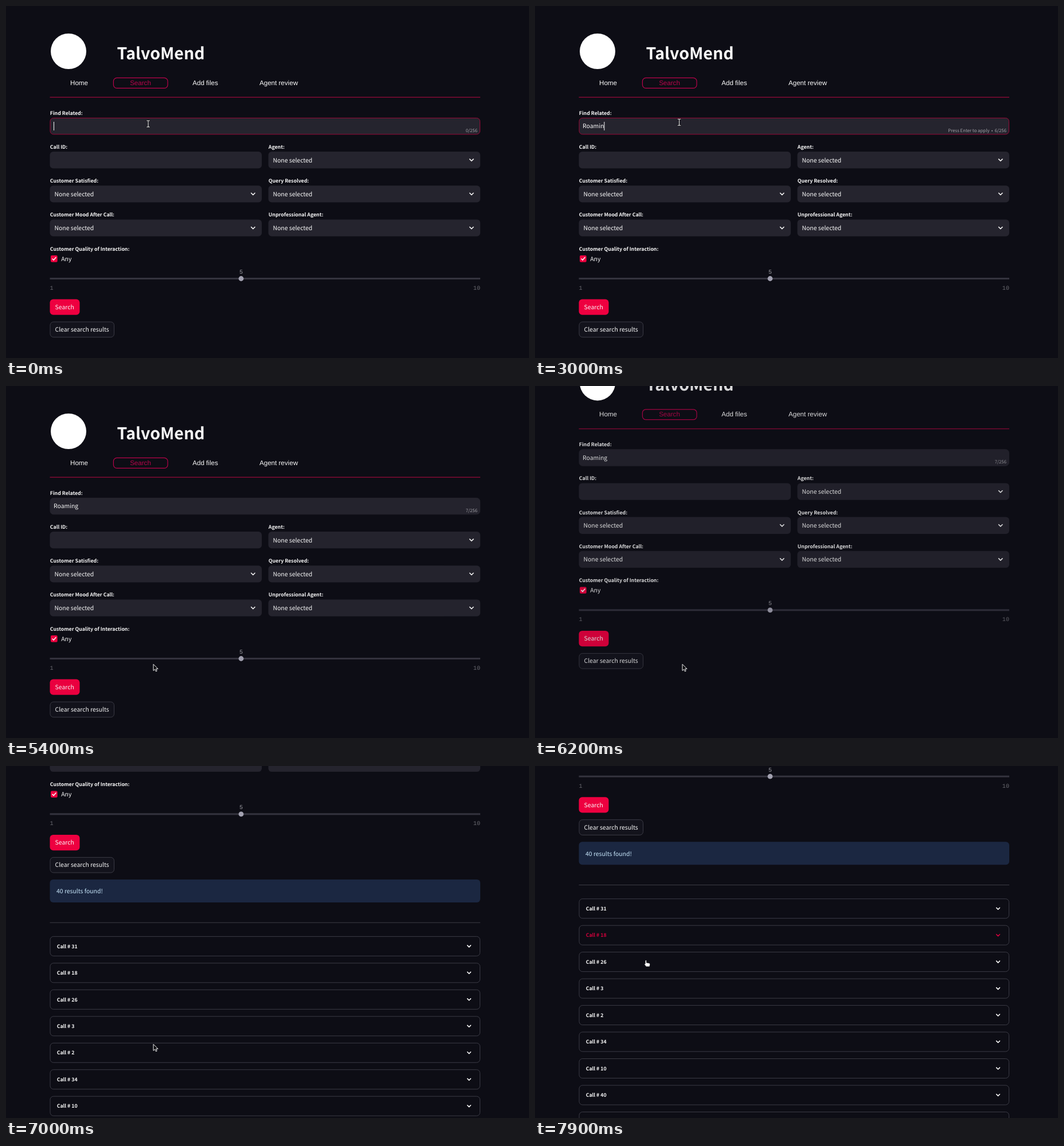
Animation, 912 px wide and 614 px high, one loop 8000 ms. Source, as an HTML page:

```html
<!DOCTYPE html>
<html lang="en">
<head>
<meta charset="utf-8">
<title>Call search</title>
<style>
html, body { margin: 0; width: 100%; height: 100%; overflow: hidden; background: #0d0d15; }
svg { display: block; width: 912px; height: 614px; }
text { font-family: "Noto Sans CJK JP", "Noto Sans CJK SC", "Noto Sans CJK", sans-serif; font-size: 10.42px; fill: #fafafa; text-rendering: geometricPrecision; white-space: pre; }
.bold { font-weight: 700; font-size: 8.75px; }
.title { font-weight: 700; font-size: 28.5px; }
.nav { font-family: "Liberation Sans", Arial, sans-serif; font-size: 11.6px; text-anchor: middle; }
.mono { font-family: "Liberation Mono", monospace; font-size: 10.15px; fill: #6a6a71; }
.small { font-size: 7.8px; fill: #a4a3aa; text-anchor: end; }
.mid { text-anchor: middle; }
.end { text-anchor: end; }
.active { fill: #b8044a; }
.value { fill: #9b9ba1; }
.info { fill: #c7e6fa; }
.chev { fill: none; stroke: #fafafa; stroke-width: 1.6; stroke-linecap: round; stroke-linejoin: round; }
.hot text { fill: #d3003c; }
.hot .chev { stroke: #d3003c; }
</style>
</head>
<body>
<svg id="stage" viewBox="0 0 912 614"></svg>
<script>
const PINK = '#ee0040', FIELD = '#25242e', EDGE = '#3b3b45';
const LOOP = 8000, STEP = 100;
const LEFT = 76.5, WIDE = 750.5, ROW = 59.2;
const CALLS = [31, 18, 26, 3, 2, 34, 10, 40, 22, 7];
const CARD_TOP = 689, CARD_GAP = 46.47;
const WORD = 'Roaming', TYPED = [1900, 2100, 2200, 2400, 2800, 3000, 3500];
const BLINK = [-300, 1000, ...TYPED];
const BLUR = 4800, FOUND = 6600, HOVER_LAG = 200;

// Markup helpers
const text = (x, y, s, cls = '', id = '') => `<text id="${id}" x="${x}" y="${y}" class="${cls}">${s}</text>`;
const box = (x, y, w, h, fill, extra = '') => `<rect x="${x}" y="${y}" width="${w}" height="${h}" rx="5.8" fill="${fill}" ${extra}/>`;
const rule = (y, h, fill) => `<rect x="${LEFT}" y="${y}" width="${WIDE}" height="${h}" fill="${fill}"/>`;
const outline = (x, y, w, h, fill = 'none') => box(x, y, w, h, fill, `stroke="${EDGE}"`);
const chevron = (x, y, r) => `<path class="chev" d="M${x - r} ${y - r / 2}l${r} ${r}l${r} ${-r}"/>`;

function field(label, i) {
  const x = LEFT + 381 * (i % 2), y = 254 + ROW * Math.floor(i / 2);
  return text(x + .3, y - 5, label, 'bold') + box(x, y, 369.5, 29.3, FIELD) +
    (i ? text(x + 8, y + 18.6, 'None selected') + chevron(x + 354.3, y + 14.7, 3.2) : '');
}

function header() {
  return text(193.5, 92.7, 'TalvoMend', 'title') +
    box(187.4, 125.4, 94.6, 17.9, 'none', 'stroke="#b8044a" stroke-width="1.2"') +
    text(127.5, 138, 'Home', 'nav') + text(234.5, 138, 'Search', 'nav active') +
    text(347.5, 138, 'Add files', 'nav') + text(475.5, 138, 'Agent review', 'nav') +
    rule(158.5, 1.4, '#8a0a37');
}

function form() {
  const labels = ['Call ID:', 'Agent:', 'Customer Satisfied:', 'Query Resolved:',
    'Customer Mood After Call:', 'Unprofessional Agent:'];
  return text(76.8, 190, 'Find Related:', 'bold') +
    box(77, 195.4, WIDE - 1, 28.4, FIELD, 'id="query"') +
    text(83, 213.4, '', '', 'word') +
    '<rect id="caret" y="202" width="1" height="15" fill="#fafafa"/>' +
    text(822, 220, '', 'small', 'count') +
    labels.map(field).join('') +
    text(76.8, 426.6, 'Customer Quality of Interaction:', 'bold') +
    `<rect x="78" y="435" width="11.7" height="11.7" rx="2" fill="${PINK}"/>` +
    '<path class="chev" d="M81 441l2 2.2l4-4.6"/>' + text(96.3, 445, 'Any') +
    rule(474, 3, '#34333e') + '<circle cx="410" cy="475.5" r="4.4" fill="#a2a1b0"/>' +
    text(410, 467, '5', 'mono mid value') + text(LEFT, 495, '1', 'mono') + text(827, 495, '10', 'mono end') +
    box(LEFT, 511.5, 52, 27.3, PINK) + text(102.2, 528.9, 'Search', 'mid') +
    outline(77, 551, 111.5, 26.7, '#13131c') + text(132.6, 568, 'Clear search results', 'mid');
}

function card(n, i) {
  const y = CARD_TOP + CARD_GAP * i;
  return `<g class="call">${outline(77, y, WIDE - 1, 34)}${text(88.7, y + 20.2, 'Call # ' + n, 'bold')}${chevron(807.5, y + 17, 2.9)}</g>`;
}

const results = () => box(LEFT, 589.5, WIDE, 40, '#1b2741') + text(88, 614, '40 results found!', 'info') +
  rule(664.3, 1, EDGE) + CALLS.map(card).join('');

const beam = (color, w) => `<path d="M-2.5 -5.5H-.8L0 -4.8L.8 -5.5H2.5M0 -4.8V4.8M-2.5 5.5H-.8L0 4.8L.8 5.5H2.5" stroke="${color}" stroke-width="${w}"/>`;
const pointers = `
<g id="beam" fill="none" stroke-linecap="round">${beam('#08080c', 2.6)}${beam('#f4f4f4', 1.1)}</g>
<path id="arrow" d="M0 -5V6.2L2.6 3.8L4.4 7.6L6.2 6.8L4.5 3.1H8Z" fill="#08080c" stroke="#f4f4f4"/>
<path id="hand" d="M-2.8 -4.8Q-1.6 -6.3 -.6 -4.8V-1.2L4.2 -.4Q5.8 0 5.6 1.8L4.8 5.6H-1.2L-4.2 1.8Q-4.4 .2 -2.8 1Z" fill="#fff" stroke="#08080c" stroke-width=".6"/>`;

document.getElementById('stage').innerHTML =
  '<g id="page"><circle cx="109" cy="79" r="31" fill="#fff"/>' +
  `<g id="body">${header()}${form()}</g><g id="results">${results()}</g></g>` + pointers;

const $ = id => document.getElementById(id);
const set = (id, name, value) => $(id).setAttribute(name, value);
const show = (id, on) => set(id, 'visibility', on ? 'visible' : 'hidden');
const calls = [...document.querySelectorAll('.call')];

// Progress of a move, 0 to 1
const ramp = (t, from, span) => Math.min(1, Math.max(0, (t - from) / span));
const easeOut = u => 1 - (1 - u) ** 2;

const scrollAt = t => 110.3 * easeOut(ramp(t, 5900, 580)) + 375.1 * easeOut(ramp(t, 6800, 400)) -
  28.1 * ramp(t, 7400, 100);

function mouseAt(t) {
  let x = 248, y = 205.5;
  const glide = (from, span, dx, dy) => {
    const u = ramp(t, from, span);
    x += dx * u;
    y += dy * u;
  };
  glide(800, 100, 1.5, .8);
  glide(1100, 200, 2, -3.5);
  glide(4000, 900, -141.5, 324);
  glide(5000, 400, 147, -36.5);
  glide(7300, 100, 4, -12);
  glide(7600, 100, -45, -178);
  glide(7800, 100, -21, 44);
  return [x, y];
}

// Index of the card under the pointer tip, trailing the mouse a little
function hoverAt(t) {
  const past = t - HOVER_LAG;
  return Math.floor((mouseAt(past)[1] - 5 + scrollAt(past) - CARD_TOP) / CARD_GAP);
}

function draw(t) {
  const n = TYPED.filter(k => k <= t).length;
  const focus = t < BLUR;
  const sinceKey = t - BLINK.filter(k => k <= t).pop();
  $('word').textContent = WORD.slice(0, n);
  set('caret', 'x', 83 + (n ? $('word').getComputedTextLength() : 0));
  show('caret', focus && sinceKey % 1000 < 500);
  set('query', 'stroke', focus ? '#970a38' : FIELD);
  $('count').innerHTML = (n && focus ? 'Press Enter to apply<tspan dx="1.5"> •</tspan><tspan dx="1.5"> </tspan>' : '') + n + '/256';

  set('page', 'transform', `translate(0 ${-scrollAt(t)})`);
  set('body', 'opacity', t < FOUND ? 1 - .14 * ramp(t, 5000, 1200) ** 2 : 1);
  show('results', t >= FOUND);
  const hot = hoverAt(t);
  calls.forEach((c, i) => c.classList.toggle('hot', i === hot));

  const [x, y] = mouseAt(t);
  const onButton = x < 128 && y > 511;
  const shape = y < 224 ? 'beam' : hot >= 0 || onButton ? 'hand' : 'arrow';
  for (const id of ['beam', 'arrow', 'hand']) {
    show(id, id === shape);
    set(id, 'transform', `translate(${x} ${y})`);
  }
}

const start = performance.now();
function tick() {
  const t = (performance.now() - start) % LOOP;
  draw(Math.floor(t / STEP) * STEP);
  requestAnimationFrame(tick);
}
tick();
</script>
</body>
</html>
```
